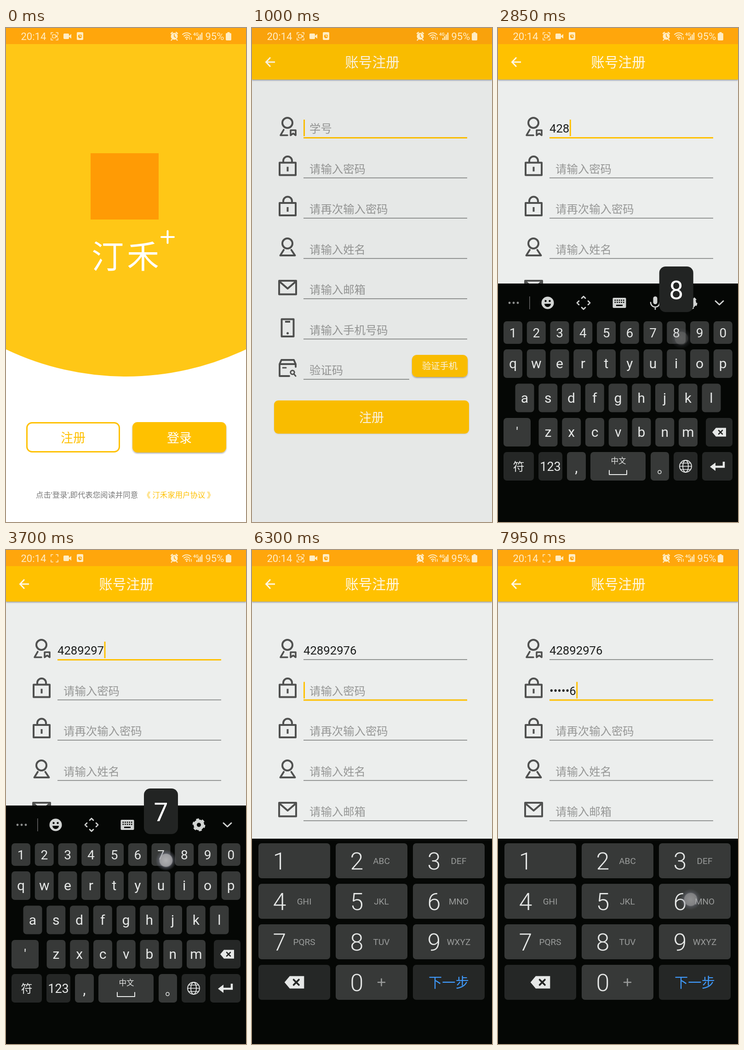
Recreate the animation shown at these times as an HTML page. Size 522 by 1073 pixels, loop 8000 ms.

```html
<!DOCTYPE html>
<html lang="zh-CN">
<head>
<meta charset="utf-8">
<title>账号注册</title>
<style>
html, body { margin: 0; width: 100%; height: 100%; overflow: hidden; background: #fff; }
svg { display: block; width: 522px; height: 1073px; font-family: Roboto, "Noto Sans CJK SC", "Noto Sans CJK", sans-serif; }
text { white-space: pre; }
.line { fill: none; stroke-linecap: round; stroke-linejoin: round; }
</style>
</head>
<body>
<svg id="stage" viewBox="0 0 522 1073" xmlns="http://www.w3.org/2000/svg"></svg>
<script>
const LOOP = 8000;
const AMBER = '#ffc103', CREAM = '#ffedc4', KEY = '#373938', DARK_KEY = '#252726', GLYPH = '#e6e8e7';
const ACCOUNT = '42892976', PASSWORD = '123456';
const ROW = 87.5, DIGIT_W = 14.43, BULLET_W = 8.66;

const text = (x, y, size, fill, s, anchor = 'middle', extra = '') =>
  `<text x="${x}" y="${y}" font-size="${size}" fill="${fill}" text-anchor="${anchor}" ${extra}>${s}</text>`;
const rect = (x, y, w, h, fill, rx = 0, extra = '') =>
  `<rect x="${x}" y="${y}" width="${w}" height="${h}" rx="${rx}" fill="${fill}" ${extra}/>`;
const circle = (x, y, r, fill, extra = '') => `<circle cx="${x}" cy="${y}" r="${r}" fill="${fill}" ${extra}/>`;
const line = (d, color, width = 4, extra = '') =>
  `<path class="line" d="${d}" stroke="${color}" stroke-width="${width}" ${extra}/>`;
const shape = (d, fill) => `<path d="${d}" fill="${fill}"/>`;
const ring = (x, y, r, color, width, extra = '') => circle(x, y, r, 'none', `stroke="${color}" stroke-width="${width}" ${extra}`);
const group = (id, body) => `<g id="${id}">${body}</g>`;

function splash() {
  return rect(0, 0, 522, 1073, '#fff')
    + shape('M0 0H522V698A607 607 0 0 1 0 698Z', '#ffc716')
    + rect(184, 272, 148, 144, '#ff9b05')
    + text(221, 522, 70, '#fff', '汀', 'middle', 'font-weight="300"')
    + text(298, 522, 70, '#fff', '禾', 'middle', 'font-weight="300"')
    + line('M338 454H365M351.5 441V467', '#fff', 4)
    + rect(45.5, 857.5, 201, 63, '#fff', 11, `stroke="${AMBER}" stroke-width="3"`)
    + text(146, 900, 27, AMBER, '注册')
    + rect(275, 856, 204, 66, AMBER, 11, 'filter="url(#shadow)"')
    + text(377, 900, 27, '#fff', '登录')
    + text(65, 1020, 16.4, '#777', "点击'登录',即代表您阅读并同意", 'start')
    + text(298, 1020, 16.4, AMBER, '《 汀禾家用户协议 》', 'start');
}

function fieldIcons() {
  const c = '#505150';
  const lock = y => line(`M60 ${y}H95V${y + 27}H60ZM68 ${y - 1}V${y - 4}a9.5 9.5 0 0 1 19 0V${y - 1}`, c)
    + rect(75.5, y + 9, 4, 10, c);
  return ring(77, 206, 11, c, 4) + line('M69 221L62 233H77M84 222H95V233L89.5 229L84 233Z', c, 3.6)
    + lock(292.5) + lock(292.5 + ROW)
    + ring(77, 468, 11, c, 4) + line('M69 482L61.5 494H93.5L85.5 482', c)
    + line('M59 549H96V578.5H59ZM59 550L77.5 566L96 550', c)
    + line('M64.5 632.5H90.5V670H64.5Z', c) + rect(72, 636, 11, 4, c) + circle(77.5, 663, 2.5, c)
    + line('M95 736V730L91 721H64L60 730V756H81M60 730H95', c, 3.8)
    + line('M67 738H74', c, 3) + ring(88, 748, 4.2, c, 3) + line('M91.5 752L95 756', c, 3);
}

function form() {
  const hints = ['学号', '请输入密码', '请再次输入密码', '请输入姓名', '请输入邮箱', '请输入手机号码', '验证码'];
  const rows = hints.map((hint, i) =>
    text(125, 227 + ROW * i, 24.4, '#969796', hint, 'start', `id="hint${i}"`)
    + rect(112, 237.3 + ROW * i, i === 6 ? 230 : 356, 1.5, '#777978', 0, `id="rule${i}"`)).join('');
  return rect(0, 0, 522, 1073, '#eceeed')
    + rect(0, 35, 522, 77, AMBER, 0, 'filter="url(#shadow)"')
    + line('M50 74H31M40 64L30.5 74L40 84', '#fff8e4', 3, 'style="stroke-linecap:butt;stroke-linejoin:miter"')
    + text(261.5, 85, 29.7, '#fff8e8', '账号注册', 'middle', 'font-weight="500"')
    + fieldIcons() + rows
    + text(112, 227, 25.7, '#1d1f1e', '', 'start', 'id="account"')
    + text(112, 227 + ROW, 25.7, '#1d1f1e', '', 'start', 'id="password"')
    + rect(112, 237, 356, 3, AMBER, 0, 'id="focus"')
    + rect(112, 199, 3, 36, AMBER, 0, 'id="caret"')
    + rect(348, 710, 121, 48, AMBER, 10, 'filter="url(#shadow)"')
    + text(408.5, 741, 19.3, '#fff8e8', '验证手机')
    + rect(48, 809, 424, 72, AMBER, 9, 'filter="url(#soft)"')
    + text(260, 856, 27, '#fff8e8', '注册');
}

const backspace = (x, y, s) => `<g transform="translate(${x} ${y}) scale(${s})">`
  + shape('M-15 0L-7 -9.5H15V9.5H-7Z', GLYPH) + line('M-1 -4L7 4M7 -4L-1 4', DARK_KEY, 2.6) + '</g>';

function toolbar() {
  const dots = [25, 34, 43].map(x => circle(x, 597, 2.4, '#8c8e8d')).join('');
  const c = '#d2d4d3';
  let pips = '';
  for (let i = 0; i < 10; i++) pips += rect(253.5 + (i % 5) * 4.6, 590 + (i > 4) * 4.6, 2.6, 2.6, '#050705');
  return dots + rect(68, 583, 1.5, 28, '#666')
    + circle(108, 597, 13.5, c) + circle(103.5, 593, 2.2, '#050705') + circle(112.5, 593, 2.2, '#050705')
    + shape('M101 599H115A7 7 0 0 1 101 599Z', '#050705')
    + line('M182 587L186 583L190 587M182 607L186 611L190 607M176 593L172 597L176 601M196 593L200 597L196 601', c, 2.8)
    + rect(249.5, 586, 29, 22, c, 2) + pips + rect(257, 601, 14, 3, '#050705')
    + rect(337.5, 583, 9, 17, c, 4.5) + line('M332 596a10 10 0 0 0 20 0M342 606V611', c, 2.6)
    + ring(419.5, 597, 8, c, 7) + ring(419.5, 597, 11.5, c, 5, 'stroke-dasharray="6 6.04"')
    + line('M473 593L481.5 601L490 593', c, 3);
}

function qwerty() {
  const key = (x, y, w, h, label, size = 29, fill = KEY) =>
    rect(x, y, w, h, fill, 7) + text(x + w / 2, y + h / 2 + 10, size, GLYPH, label);
  const run = (chars, x, y, h, size) =>
    [...chars].map((ch, i) => key(x + 50.75 * i, y, 41, h, ch, size)).join('');
  return rect(0, 555, 522, 518, '#050705') + toolbar()
    + run('1234567890', 12, 637, 49, 28)
    + run('qwertyuiop', 12, 698, 62, 30)
    + run('asdfghjkl', 37.5, 772.5, 62, 30)
    + key(12, 847, 59, 62, "'", 30) + run('zxcvbnm', 88.5, 847, 62, 30)
    + key(452, 847, 58, 62, '', 0, DARK_KEY) + backspace(481, 878, 1)
    + key(12, 921, 66, 62, '符', 25, DARK_KEY) + key(88, 921, 52, 62, '123', 27, DARK_KEY)
    + key(150, 921, 41, 62, '', 0) + text(170.5, 965, 32, GLYPH, ',')
    + rect(201, 921, 120, 62, KEY, 7) + text(262, 946, 16.5, GLYPH, '中文')
    + line('M242 961V970H280V961', GLYPH, 2)
    + key(332, 921, 40, 62, '', 0) + text(346, 967, 28, GLYPH, '。', 'start')
    + key(382, 921, 52, 62, '', 0, DARK_KEY) + ring(408, 952, 13, GLYPH, 1.8)
    + `<ellipse cx="408" cy="952" rx="6" ry="13" fill="none" stroke="${GLYPH}" stroke-width="1.8"/>`
    + line('M395 952H421M397 945H419M397 959H419', GLYPH, 1.6)
    + key(444, 921, 66, 62, '', 0, DARK_KEY)
    + line('M491 942V953H470', GLYPH, 4.5, 'style="stroke-linecap:butt;stroke-linejoin:miter"')
    + shape('M461 953L473 944V962Z', GLYPH);
}

function numpad() {
  const letters = ['', 'ABC', 'DEF', 'GHI', 'JKL', 'MNO', 'PQRS', 'TUV', 'WXYZ'];
  const key = (col, row, label, sub, size = 19) => {
    const x = 14 + 168 * col, y = 637 + 88 * row;
    return rect(x, y, 156, 76, KEY, 7)
      + text(x + 46, y + 56.5, 52, GLYPH, label, 'middle', 'font-weight="300"')
      + text(x + 99.5, y + 38 + size * .36, size, '#9a9c9b', sub);
  };
  return rect(0, 627, 522, 446, '#050705')
    + letters.map((sub, i) => key(i % 3, Math.floor(i / 3), i + 1, sub)).join('')
    + key(1, 3, 0, '') + line('M274 939H289M281.5 931.5V946.5', '#9a9c9b', 2.6)
    + rect(14, 901, 156, 76, DARK_KEY, 7) + backspace(92, 939, 1.42)
    + rect(350, 901, 156, 76, DARK_KEY, 7) + text(428, 950, 29.3, '#3f98f8', '下一步');
}

function statusIcons() {
  const c = CREAM;
  const bars = [0, 1, 2, 3].map(i => rect(414 + i * 3.6, 22 - i * 4, 2.4, 4 + i * 4, c)).join('');
  return text(32.5, 26, 22, c, '20:14', 'start')
    + line('M98 14V10H102M109 10H113V14M113 22V26H109M102 26H98V22', c, 1.6)
    + group('rec', rect(101, 14.5, 7, 7, 'none', 1, `stroke="${c}" stroke-width="1.5"`) + shape('M108 18L112 15V21Z', c))
    + rect(125, 12, 12, 12, c, 2) + shape('M136 18L142 13V23Z', c)
    + rect(154, 9, 14, 17, c, 2) + circle(161, 18, 4.2, '#ffa60c') + line('M161 18V14.5M161 18H164', c, 1.4)
    + circle(366, 18, 7.5, c) + line('M366 14V18.5L369 20.5', '#ffa60c', 1.6)
    + line('M359 12L362 9.5M373 12L370 9.5M361 25L359.5 26.5M371 25L372.5 26.5', c, 2.4)
    + line('M384 14a13 13 0 0 1 18 0M387 17.5a8.5 8.5 0 0 1 12 0M390 21a4.5 4.5 0 0 1 6 0', c, 2)
    + circle(393, 24, 1.8, c) + line('M399 20V25M403 20V25', c, 1.6)
    + text(407, 17, 9.5, c, '4G', 'start', 'font-weight="700"') + bars
    + text(433.5, 26, 22, c, '95%', 'start')
    + rect(478, 11, 12, 16, c, 2) + rect(481.5, 9, 5, 3, c);
}

const stage = document.getElementById('stage');
stage.innerHTML = `<defs>
  <filter id="shadow" x="-10%" y="-20%" width="120%" height="150%"><feDropShadow dx="0" dy="2" stdDeviation="1.8" flood-opacity=".32"/></filter>
  <filter id="soft" x="-5%" y="-10%" width="110%" height="130%"><feDropShadow dx="0" dy="1" stdDeviation=".8" flood-opacity=".15"/></filter>
  <radialGradient id="glow"><stop offset="0" stop-color="#bdbdbf" stop-opacity=".9"/><stop offset=".58" stop-color="#a9a9ad" stop-opacity=".88"/>
  <stop offset=".68" stop-color="#777a88" stop-opacity=".45"/><stop offset="1" stop-color="#777a88" stop-opacity="0"/></radialGradient></defs>`
  + group('splash', splash()) + group('form', form())
  + rect(0, 0, 522, 35, '#ffa60c') + rect(0, 0, 522, 1073, '#000', 0, 'id="dim"')
  + group('numpad', numpad()) + group('qwerty', qwerty())
  + group('popup', rect(0, 518, 74, 99, '#222423', 14) + text(37, 589, 55, '#fff', '', 'middle', 'id="popupDigit"'))
  + circle(0, 0, 23, 'url(#glow)', 'id="touch"') + statusIcons();

const el = {};
stage.querySelectorAll('[id]').forEach(node => el[node.id] = node);
const set = (id, attrs) => { for (const k in attrs) el[id].setAttribute(k, attrs[k]); };
const show = (id, opacity) => set(id, { opacity: +opacity, visibility: opacity > 0 ? 'visible' : 'hidden' });
const clamp = v => Math.min(1, Math.max(0, v));
const ramp = (t, a, b) => clamp((t - a) / (b - a));

// Piecewise linear value through [time, value] stops.
function track(t, stops) {
  let value = stops[0][1];
  for (let i = 1; i < stops.length; i++) {
    const [t0, v0] = stops[i - 1], [t1, v1] = stops[i];
    if (t >= t0) value = v0 + (v1 - v0) * ramp(t, t0, t1);
  }
  return value;
}

const keyX = d => 32.5 + 50.75 * ((+d + 9) % 10);
const accountTaps = [...ACCOUNT].map((d, i) => ({
  time: i < 7 ? 2270 + 237 * i : 4180, digit: d, x: keyX(d) + 11, y: 674
}));
const passwordTaps = [...PASSWORD].map((d, i) => ({
  time: 6870 + 205 * i, x: 82 + 168.5 * (i % 3), y: 671 + 88 * Math.floor(i / 3)
}));
const taps = [
  { time: 350, x: 152, y: 892 }, { time: 1250, x: 250, y: 217 },
  ...accountTaps, { time: 5980, x: 262, y: 304 }, ...passwordTaps
];
const caretResets = [650, 1450, ...accountTaps.map(p => p.time), 6045, ...passwordTaps.map(p => p.time)];
const countUntil = (list, t) => list.filter(p => p.time <= t).length;

function draw(t) {
  show('form', track(t, [[600, 0], [750, .59], [870, 1]]));
  show('dim', track(t, [[600, 0], [740, .265], [1000, .025], [1050, 0]]));
  show('rec', (t + 1092 - 45) % 1092 >= 546);

  const typed = countUntil(accountTaps, t), secret = countUntil(passwordTaps, t);
  el.account.textContent = ACCOUNT.slice(0, typed);
  el.password.textContent = secret ? '•'.repeat(secret - 1) + PASSWORD[secret - 1] : '';
  show('hint0', !typed);
  show('hint1', !secret);

  const row = t < 6045 ? 0 : 1;
  const textWidth = row ? (secret && (secret - 1) * BULLET_W + DIGIT_W) : typed * DIGIT_W;
  const reset = caretResets.filter(r => r <= t).pop() || 0;
  set('focus', { y: 237 + ROW * row });
  set('caret', { x: 112 + textWidth + (textWidth ? .5 : 0), y: 199 + ROW * row });
  show('caret', (t - reset) % 1000 < 500);

  const slide = t < 1350 ? 518 : t < 2100 ? 518 * Math.exp(-(t - 1350) / 90) : 0;
  set('qwerty', { transform: `translate(0 ${slide})` });
  show('qwerty', t < 1350 ? 0 : 1 - ramp(t, 6120, 6250));
  show('numpad', ramp(t, 6100, 6200));

  const pressed = accountTaps.find(p => t >= p.time - 40 && t < p.time + 110);
  show('popup', !!pressed);
  if (pressed) {
    const x = Math.min(448, Math.max(0, keyX(pressed.digit) - 37));
    set('popup', { transform: `translate(${x} 0)` });
    el.popupDigit.textContent = pressed.digit;
  }

  const tap = taps.find(p => t >= p.time - 60 && t < p.time + 150);
  show('touch', tap ? Math.min(ramp(t, tap.time - 60, tap.time - 20), 1 - ramp(t, tap.time + 20, tap.time + 150)) : 0);
  if (tap) set('touch', { cx: tap.x, cy: tap.y });
}

const start = performance.now();
function tick() {
  draw((performance.now() - start) % LOOP);
  requestAnimationFrame(tick);
}
tick();
</script>
</body>
</html>
```
